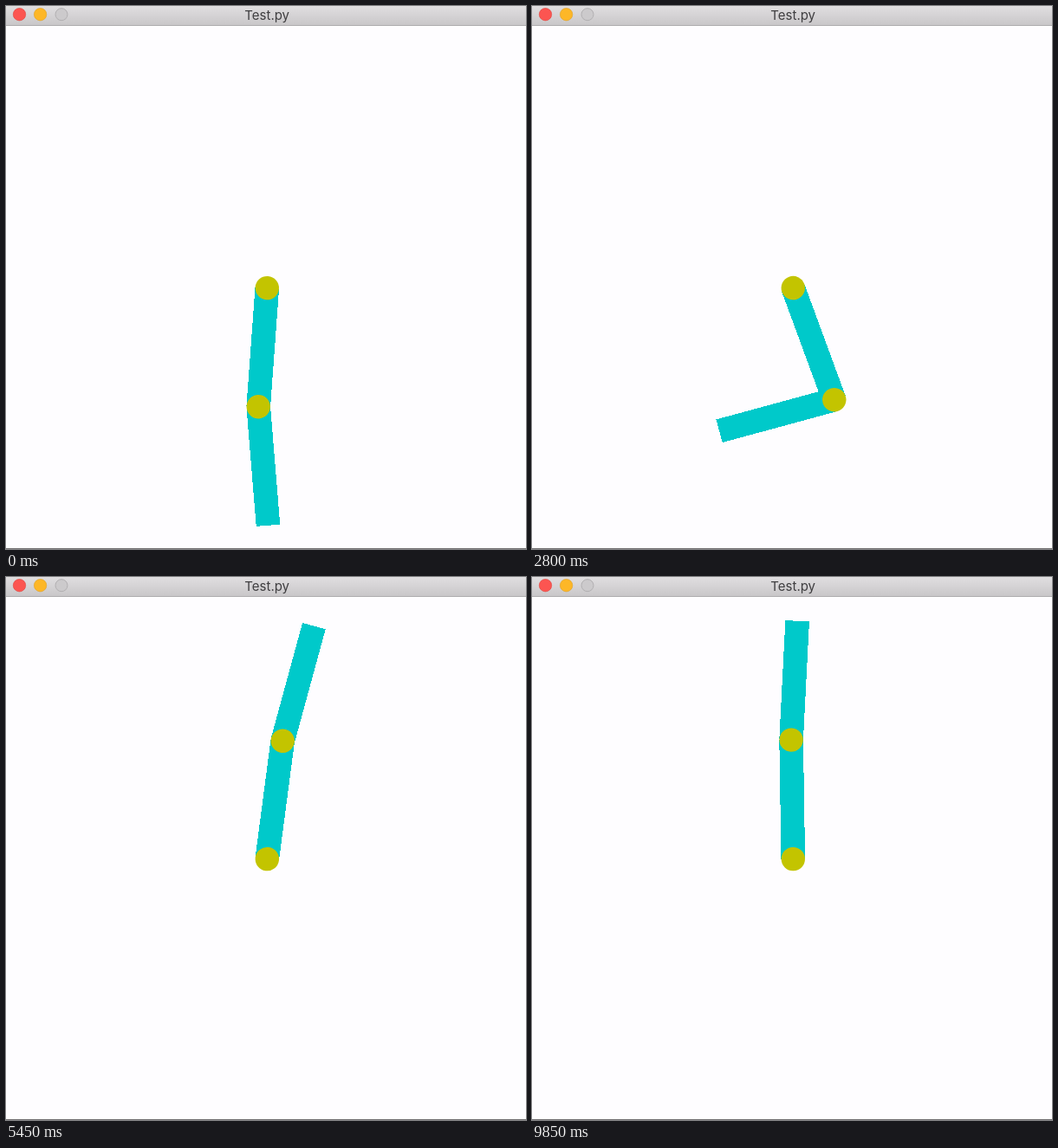
An HTML page that plays this animation: 600 px wide and 627 px high, repeating every 9.9 s.

```html
<!DOCTYPE html>
<html lang="en">
<head>
<meta charset="utf-8">
<title>Test.py</title>
<style>
  html, body { margin: 0; width: 100%; height: 100%; overflow: hidden; background: #fefdff; }
  svg { display: block; width: 600px; height: 627px; }
  text { font: 15px Inter, Roboto, sans-serif; fill: #3f3e40; text-anchor: middle; }
  .link { fill: #00c9ca; shape-rendering: crispEdges; }
  .joint { fill: #c3c400; }
</style>
</head>
<body>
<svg viewBox="0 0 600 627">
  <defs>
    <linearGradient id="bar" x2="0" y2="1">
      <stop offset="0" stop-color="#e0dee0"/>
      <stop offset="1" stop-color="#c9c7c9"/>
    </linearGradient>
    <g id="arm">
      <rect class="link" x="-13.8" width="27.6" height="137.5"/>
      <circle class="joint" r="13.7"/>
    </g>
  </defs>
  <rect width="600" height="627" fill="#fefdff"/>
  <rect width="600" height="22" fill="url(#bar)"/>
  <rect y="22" width="600" height="1" fill="#aeacae"/>
  <circle cx="15.5" cy="9.7" r="7.2" fill="#fc5551" stroke="#e0443f" stroke-width=".6"/>
  <circle cx="39.6" cy="9.7" r="7.2" fill="#fdb727" stroke="#dfa023" stroke-width=".6"/>
  <circle cx="64" cy="9.7" r="7" fill="#cccacc" stroke="#b2b0b2"/>
  <text x="301.2" y="16">Test.py</text>
  <rect y="626" width="600" height="1" fill="#737173"/>
  <use id="upper" href="#arm"/>
  <use id="lower" href="#arm"/>
</svg>
<script>
const LOOP = 9.9, FPS = 20, CATCH = 5, LENGTH = 137.5;
const BASE = { x: 301.3, y: 325.6 };

// Each swing: time in s, turning angle in degrees from straight down,
// and the skew of the easing that leads there.
const upperSwings = [
  [0, -4.2], [0.75, 7], [1.65, -35], [2.48, 75], [3.57, -102.5, 0.8], [5.2, 165]
];
const lowerSwings = [
  [0, 4.7], [0.42, 30], [1.2, -42], [2.13, 148.5, 1.5], [2.9, -80, 0.73],
  [3.07, -61], [3.5, -210], [4.52, 40, 1.2], [4.64, 36], [5.3, 162]
];

const upper = document.getElementById("upper");
const lower = document.getElementById("lower");

// Pendulum-like easing from one turning point to the next
function swing(swings, t) {
  const i = swings.findIndex(([end]) => end > t);
  const [t0, from] = swings[i - 1];
  const [t1, to, skew = 1] = swings[i];
  const u = ((t - t0) / (t1 - t0)) ** skew;
  return from + (to - from) * (1 - Math.cos(Math.PI * u)) / 2;
}

// Exponential approach to the upright pose with a slow drift
function settle(s, rest, drift, gap, tau) {
  return rest + drift * s - gap * Math.exp(-s / tau);
}

function place(link, x, y, deg) {
  link.setAttribute("transform", `translate(${x} ${y}) rotate(${-deg})`);
}

function draw(seconds) {
  const t = Math.floor((seconds % LOOP) * FPS + 1e-6) / FPS;
  const s = t - CATCH;
  const a = s < 0 ? swing(upperSwings, t) : settle(s, 179.6, 0.27, 24.4, 0.369);
  const b = s < 0 ? swing(lowerSwings, t) : settle(s, 181, -0.81, 73, 0.295);
  const rad = a * Math.PI / 180;
  place(upper, BASE.x, BASE.y, a);
  place(lower, BASE.x + LENGTH * Math.sin(rad), BASE.y + LENGTH * Math.cos(rad), b);
}

const start = performance.now();
function tick() {
  draw((performance.now() - start) / 1000);
  requestAnimationFrame(tick);
}
tick();
</script>
</body>
</html>
```
